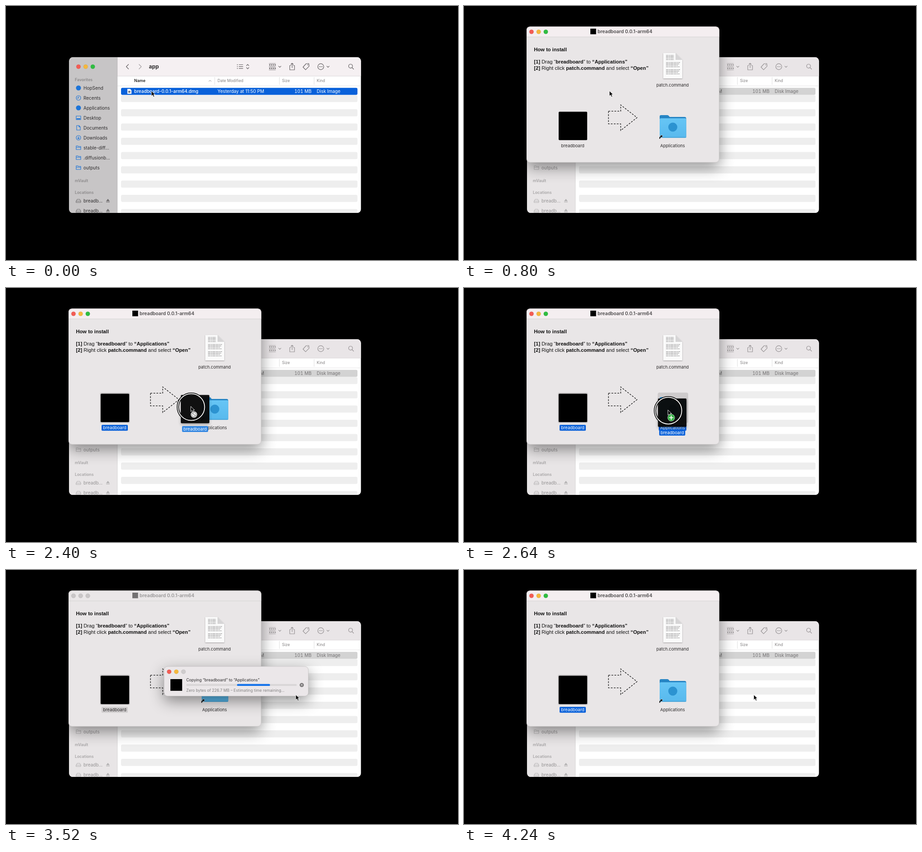
These frames come from a looping animation (998x561 px, 4320 ms). An HTML page:

```html
<!DOCTYPE html>
<html lang="en">
<head>
<meta charset="utf-8">
<title>Install</title>
<style>
  html, body { margin: 0; width: 100%; height: 100%; overflow: hidden; background: #000; }
  svg { display: block; width: 998px; height: 561px; }
  text { font-family: Inter, "Open Sans", sans-serif; white-space: pre; }
  .line { fill: none; stroke-linecap: round; stroke-linejoin: round; }

  #browser { --side: #c7c5c6; --bar: #f5f0f2; --item: #2f2d2e; --icon: #1d74d8; --drive: #6d6b6c;
    --group: #8b898a; --tool: #656163; --row: #0961da; --rowText: #fff; --name: #222; }
  #browser.idle { --side: #e8e5e6; --bar: #e9e5e7; --item: #959394; --icon: #bab8b9; --drive: #b3b1b2;
    --group: #a7a5a6; --tool: #969294; --row: #d3d3d3; --rowText: #747273; --name: #777; }
  #installer { --bar: #f4eef0; --title: #4b494a; --mark: #000; }
  #installer.idle { --bar: #eae7e8; --title: #979596; --mark: #737172; }
  .idle .light { fill: #c9c6c7; stroke: #b9b6b7; }
  .tools .line { stroke: var(--tool); stroke-width: 1.2; }
  .tools .solid { fill: var(--tool); }
  .blue .line { stroke: var(--icon); stroke-width: 1.1; }
  .shadow { filter: drop-shadow(0 11px 16px rgba(0, 0, 0, .42)); }
  .lift { filter: drop-shadow(0 3px 3px rgba(0, 0, 0, .3)); }
  .note { font: 11.17px "Liberation Sans", Arial, sans-serif; }
  .note tspan { font-weight: 700; }
</style>
</head>
<body>
<svg id="stage" viewBox="0 0 998 561"></svg>
<script>
const LOOP = 4320, STEP = 80;

const text = (x, y, s, size = 10, fill = 'var(--item)', more = '') =>
  `<text x="${x}" y="${y}" font-size="${size}" fill="${fill}" ${more}>${s}</text>`;
const rect = (x, y, w, h, fill, r = 0, more = '') =>
  `<rect x="${x}" y="${y}" width="${w}" height="${h}" rx="${r}" fill="${fill}" ${more}/>`;
const circle = (x, y, r, fill, more = '') =>
  `<circle cx="${x}" cy="${y}" r="${r}" fill="${fill}" ${more}/>`;
const line = (d, more = '') => `<path class="line" d="${d}" ${more}/>`;
const at = (x, y, body) => `<g transform="translate(${x} ${y})">${body}</g>`;
const middle = 'text-anchor="middle"';

const lights = (x, y, colors = ['#f35c54', '#f5b83d', '#2fbd41']) =>
  colors.map((c, i) => circle(x + i * 15.8, y, 4.8, c, 'class="light" stroke="#0002" stroke-width=".5"')).join('');

const label = (id, x, y, s, w) =>
  `<g id="${id}">${rect(x - w / 2, y - 9.6, w, 13, 'var(--tag, none)', 2)}
   ${text(x, y, s, 9.4, 'var(--ink, #2a2829)', middle)}</g>`;

// Sidebar glyphs, drawn around their own centre
const glyph = {
  disc: circle(0, 0, 5.5, 'var(--icon)'),
  clock: line('M5 0A5 5 0 1 1 -5 0A5 5 0 1 1 5 0M0 -3V.4H-2.6'),
  desk: line('M-5 -4H5V4H-5Z') + rect(-4, 1, 8, 2.4, 'var(--icon)'),
  page: line('M-4 -5H1L4 -2V5H-4ZM1 -5V-2H4'),
  down: line('M5 0A5 5 0 1 1 -5 0A5 5 0 1 1 5 0M0 -2.7V2.5M-2 .5L0 2.5L2 .5'),
  folder: line('M-5 4V-4H-1.5L-.3 -2.8H5V4ZM-5 -.8H5'),
};

function sidebar() {
  const rows = [['disc', 'HopSend'], ['clock', 'Recents'], ['disc', 'Applications'], ['desk', 'Desktop'],
    ['page', 'Documents'], ['down', 'Downloads'], ['folder', 'stable-diff...'],
    ['folder', '.diffusionb...'], ['folder', 'outputs']];
  const head = (y, s) => text(152, y, s, 8.8, 'var(--group)', 'font-weight="600"');
  const drive = y => at(160, y, line('M-5 1L-3 -3H3L5 1V4H-5ZM-5 1H5', 'stroke="var(--drive)"')) +
    text(171, y + 3.6, 'breadb...') +
    at(225, y, '<path d="M0 -4L4 1H-4ZM-4 2.2H4V3.5H-4Z" fill="var(--drive)"/>');
  return head(165.5, 'Favorites') +
    `<g class="blue">${rows.map(([g, s], i) =>
      at(160, 181 + i * 22, glyph[g]) + text(171, 184.6 + i * 22, s)).join('')}</g>` +
    head(389.2, 'mVault') + head(414.6, 'Locations') + drive(430) + drive(452);
}

function tools() {
  const dots = (xs, ys, w) => ys.map(y => xs.map(x => rect(x, y, w, w, 'var(--tool)', .5)).join('')).join('');
  const drop = x => line(`M${x - 2.6} 132.8L${x} 135.4L${x + 2.6} 132.8`);
  return `<g class="tools">
    ${line('M270.5 129L265.5 134L270.5 139')}
    ${line('M293.8 129L298.8 134L293.8 139', 'opacity=".55"')}
    ${text(315.5, 138, 'app', 11.9, 'var(--item)', 'font-weight="700"')}
    ${dots([510], [128.7, 132.9, 137.1], 1.7)}${line('M514.5 129.5H523M514.5 133.7H523M514.5 137.9H523')}
    ${line('M531 131.8L533.6 129L536.2 131.8M531 136L533.6 138.8L536.2 136')}
    ${dots([581, 585, 589, 593], [129, 136.5], 2.6)}${line('M581 127H595M581 134.4H595M581 141H595', 'opacity=".8"')}
    ${drop(604.5)}
    ${line('M629 131.5H626.5V141H637V131.5H634.5M631.8 136.5V126.3M629 129L631.8 126.3L634.5 129')}
    ${line('M662.5 127.5L668.5 127L669.3 132.8L661.5 140.8L655.8 135Z')}${circle(666.4, 130, 1, 'var(--tool)')}
    ${circle(695, 134, 6.6, 'none', 'class="line"')}
    ${[692, 695, 698].map(x => circle(x, 134, .9, 'var(--tool)')).join('')}${drop(711)}
    ${circle(760.8, 132.8, 4.3, 'none', 'class="line"')}${line('M764 136L767.5 139.5')}
  </g>`;
}

function browser() {
  const stripes = Array.from({ length: 9 }, (_, i) => rect(254, 196.5 + i * 31.5, 522, 15.7, '#eee', 3)).join('');
  const col = (x, s) => text(x, 168, s, 8.6, '#807e7f');
  const cell = (x, s, more = '') => text(x, 192.2, s, 10, 'var(--rowText)', more);
  return `<clipPath id="cut">${rect(139.3, 113.3, 644.4, 343.8, '#fff', 8)}</clipPath>
  <g id="browser" clip-path="url(#cut)">
    ${rect(139, 113, 645, 345, '#fff')}
    ${rect(139, 113, 107, 345, 'var(--side)')}
    ${rect(246, 113, 538, 42, 'var(--bar)')}
    ${rect(245.6, 113, .8, 345, '#0002')}${rect(246, 154.5, 538, .8, '#d5d2d3')}
    ${rect(246, 176, 538, .8, '#e2e0e1')}
    ${lights(160, 134)}${sidebar()}${tools()}
    ${text(283, 168, 'Name', 8.8, 'var(--name)', 'font-weight="600"')}
    ${line('M448 166.5L450.5 164L453 166.5', 'stroke="#8a8889"')}
    ${col(467, 'Date Modified')}${col(609.5, 'Size')}${col(686, 'Kind')}
    ${[460.5, 603.3, 679.8].map(x => rect(x, 157, .8, 17, '#d8d6d7')).join('')}
    ${stripes}${rect(254, 180.8, 522, 15.4, 'var(--row)', 3)}
    <path d="M268 183H274L277 186V194H268Z" fill="#fff"/>${rect(269.8, 187.5, 5, 4, '#77777c', 1)}
    ${cell(283, 'breadboard-0.0.1-arm64.dmg', 'font-weight="500"')}
    ${cell(467, 'Yesterday at 11:50 PM')}
    ${cell(674.5, '101 MB', 'text-anchor="end" style="font-feature-settings:\'tnum\'"')}
    ${cell(686, 'Disk Image')}
  </g>`;
}

function script() {
  const rows = Array.from({ length: 15 }, (_, i) => {
    const y = 109 + i * 3.15, end = i < 5 ? 464 : 477 - (i * 7 % 5);
    return i % 5 == 4 ? '' : `M446 ${y}H${end}`;
  }).join('');
  return `<g class="lift" style="filter:drop-shadow(0 1px 1px #0005)">
    <path d="M440 104H467L482 119V160H440Z" fill="#fafafa"/><path d="M467 104V119H482Z" fill="#d6d5d6"/></g>
    <path d="${rows}" stroke="#8d8c8d" stroke-width="1.1" stroke-dasharray="5 .8 3 .7 7 .9" fill="none"/>`;
}

const folder = `
  <path d="M432 289V244Q432 241 435 241H449Q451 241 452.5 243L454 245H487Q490.500 245 490.500 248V289Z" fill="#2785c4"/>
  ${rect(432, 248, 58.6, 43.3, 'url(#sky)', 2.5)}${rect(432, 289.4, 58.6, 1.6, '#419fd5', .8)}
  ${circle(461, 267.5, 10, '#2c93d1')}
  <path d="M431 293.500Q430.500 288.500 434.500 287.600L432.800 285.800L438.300 285.400L437.600 291L436 289.300Q433.500 290 433 293.500Z" fill="#000" stroke="#fff" stroke-width=".5"/>`;

function installer() {
  return `<g id="installer" class="shadow">
    ${rect(138, 45.6, 425.6, 300, '#e9e6e7', 8)}
    <path d="M138 68V53.600Q138 45.600 146 45.600H555.600Q563.600 45.600 563.600 53.600V68Z" fill="var(--bar)"/>
    ${rect(138, 67.8, 425.6, .8, '#d0cdce')}
    ${rect(138.3, 45.9, 425, 299.4, 'none', 8, 'stroke="#bab7b8" stroke-width=".6"')}
    ${lights(149, 57)}
    ${rect(279, 50, 12.6, 12.4, 'var(--mark)')}
    ${text(295, 60.1, 'breadboard 0.0.1-arm64', 10.3, 'var(--title)', 'font-weight="600"')}
    <g class="note" fill="#111">
      <text class="note" x="154.500" y="100.300"><tspan>How to install</tspan></text>
      <text class="note" x="154.500" y="127.300"><tspan>[1]</tspan> Drag “<tspan>breadboard</tspan>” to <tspan>“Applications”</tspan></text>
      <text class="note" x="154.500" y="140.700"><tspan>[2]</tspan> Right click <tspan>patch.command</tspan> and select <tspan>“Open”</tspan></text>
    </g>
    ${script()}${label('patch', 460.5, 178, 'patch.command', 74)}
    <path d="M319 232.300H346V218.500L382 246.500L346 275V260.300H319Z" fill="none" stroke="#111" stroke-width="1.3" stroke-dasharray="3.800 2.800"/>
    <g id="picked">${rect(207, 231, 67, 67.3, '#cecbcc', 4)}</g>
    ${rect(209, 233.5, 63, 62.8, '#000', 2)}
    ${label('appLabel', 240, 311.8, 'breadboard', 58)}
    <g id="hover">${rect(427.7, 231, 67.3, 67.3, '#cecbcc', 4)}</g>
    ${folder}${label('dirLabel', 460.5, 311.8, 'Applications', 61)}
  </g>`;
}

const dialog = `<g id="dialog" class="shadow">
  ${rect(349, 213, 318.6, 65.5, '#ebe7e9', 8, 'stroke="#b5b2b3" stroke-width=".6"')}
  ${lights(360.2, 224.7, ['#f35c54', '#f5b83d', '#cfcccd'])}
  ${rect(363, 241, 26, 25.8, '#000')}
  ${text(398, 246, 'Copying “breadboard” to “Applications”', 8.67, '#2b292a')}
  ${rect(398, 251.7, 244, 4.4, '#d9d6d7', 2.2)}
  <g id="bar">${rect(0, 251.7, 73, 4.4, '#1573ea', 2.2)}</g>
  ${circle(653, 254, 4.6, '#767374')}${line('M651.400 252.400L654.600 255.600M654.600 252.400L651.400 255.600', 'stroke="#eee" stroke-width="1.1"')}
  ${text(398, 268.9, 'Zero bytes of 226.7 MB – Estimating time remaining...', 8.65, '#828081')}
</g>`;

// Pointer parts are placed relative to the arrow tip
const drag = `<g id="drag">
  <g class="lift" opacity=".96">${rect(-22, -25.3, 63, 62.6, '#080808', 2)}</g>
  <g id="dragLabel" style="--ink:#fff">${label('dragText', 9.5, 53.2, 'breadboard', 57.5)}</g>
</g>`;
const ring = `<g id="ring" fill="none">${circle(1, 1.5, 29.5, 'none', 'stroke="#000" stroke-width="5"')}
  ${circle(1, 1.5, 29.5, 'none', 'stroke="#f2f2f2" stroke-width="2"')}</g>`;
const pointer = `<g id="pointer">
  <path d="M0 0V11.500L2.700 9L4.600 13.300L6.700 12.400L4.900 8.200H8.400Z" fill="#000" stroke="#fff" stroke-width=".9" stroke-linejoin="round"/>
  <g id="deny">${circle(7, 18, 7, '#f5f5f5')}${circle(7, 18, 5, 'none', 'stroke="#a5a5a5" stroke-width="1.8"')}
    ${line('M3.600 14.600L10.400 21.400', 'stroke="#a5a5a5" stroke-width="1.8"')}</g>
  <g id="plus">${circle(7.3, 17, 7.7, '#35b144', 'stroke="#e8f5e8" stroke-width=".7"')}
    ${line('M7.300 13V21M3.300 17H11.300', 'stroke="#fff" stroke-width="1.9"')}</g>
</g>`;

const $ = id => document.getElementById(id);
$('stage').innerHTML = `<defs><linearGradient id="sky" x2="0" y2="1">
  <stop stop-color="#66c5f5"/><stop offset="1" stop-color="#58b9ed"/></linearGradient></defs>
  ${browser()}${installer()}${dialog}${drag}${ring}${pointer}`;

const ease = {
  both: p => p * p * (3 - 2 * p),
  out: p => 1 - (1 - p) ** 2,
  none: p => p,
};
const PATH = [
  [0, 321, 187.5], [800, 321, 187.5, 'none'], [1440, 247, 257.5, 'both'], [1680, 247, 257.5, 'none'],
  [1840, 231, 259, 'both'], [2400, 408, 261.5, 'both'], [2880, 464.3, 272, 'out'],
  [3120, 464.3, 272, 'none'], [3520, 639.8, 275.5, 'both'], [LOOP, 639.8, 275.5, 'none'],
];

function tip(t) {
  const i = PATH.findIndex(k => k[0] > t), a = PATH[i - 1], b = PATH[i];
  const p = ease[b[3]]((t - a[0]) / (b[0] - a[0]));
  return [a[1] + (b[1] - a[1]) * p, a[2] + (b[2] - a[2]) * p];
}

const show = (id, on) => $(id).style.display = on ? '' : 'none';
function tag(id, color, ink) {
  $(id).style.setProperty('--tag', color);
  $(id).style.setProperty('--ink', ink);
}

function draw(t) {
  const [x, y] = tip(t);
  const held = t >= 1920 && t < 3200;
  const over = held && x > 428;
  const copying = t >= 3280 && t < 4160;
  const chosen = t >= 1520;

  // The window grows out of the clicked file
  const grow = ease.out(Math.max(0, Math.min(1, (t - 80) / 400)));
  show('installer', grow > 0);
  $('installer').setAttribute('transform', `translate(${272 * (1 - grow)} ${188 * (1 - grow)}) scale(${grow})`);
  $('installer').style.opacity = Math.min(1, grow * 1.3);
  $('browser').classList.toggle('idle', t >= 160);
  $('installer').classList.toggle('idle', copying);

  show('picked', chosen);
  if (!chosen) tag('appLabel', 'none', '#2a2829');
  else if (t >= 3280 && t < 4240) tag('appLabel', '#d0cdce', '#2a2829');
  else tag('appLabel', '#0961da', '#fff');

  show('hover', over);
  tag('dirLabel', over ? '#0961da' : 'none', over ? '#fff' : '#2a2829');

  show('drag', held);
  tag('dragText', over ? '#0d63da' : '#3387e2', '#fff');
  show('ring', held && t < 3120);
  show('deny', held && !over);
  show('plus', over);
  for (const id of ['drag', 'ring', 'pointer']) $(id).setAttribute('transform', `translate(${x} ${y})`);

  show('dialog', copying);
  const run = Math.max(0, t - 3360) * .7 % 342;
  $('bar').setAttribute('transform', `translate(${398 + (run > 171 ? 342 - run : run)} 0)`);
}

const start = performance.now();
function tick() {
  const t = (performance.now() - start) % LOOP;
  draw(Math.floor(t / STEP) * STEP);
  requestAnimationFrame(tick);
}
draw(0);
requestAnimationFrame(tick);
</script>
</body>
</html>
```
